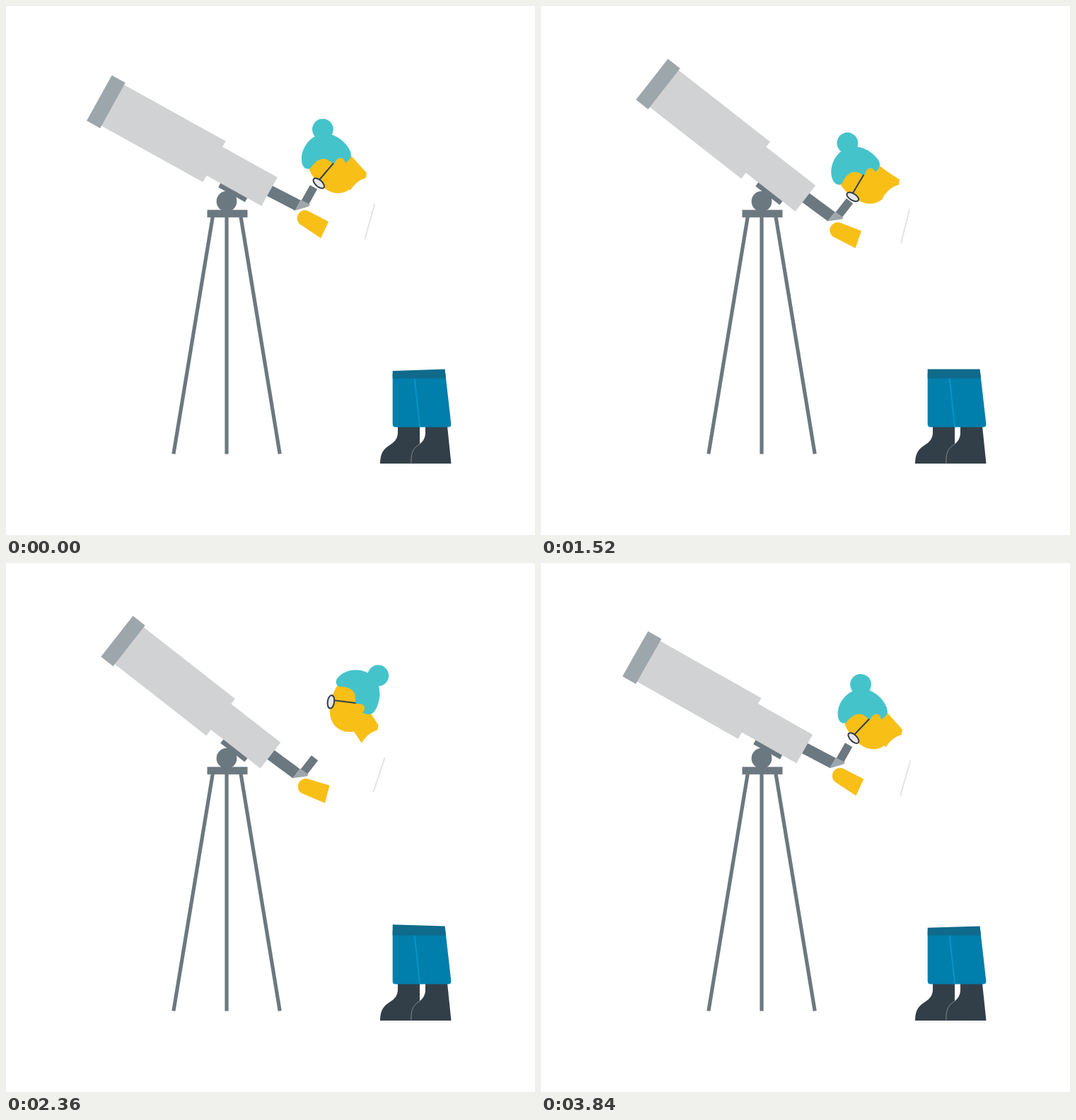
Recreate the animation shown at these times as an HTML page. Size 748x748 px, loop 3880 ms.

```html
<!DOCTYPE html>
<html lang="en">
<head>
<meta charset="utf-8">
<title>Stargazer</title>
<style>
html, body { margin: 0; width: 100%; height: 100%; overflow: hidden; background: #fff; }
svg { display: block; width: 100vw; height: 100vh; }
</style>
</head>
<body>
<svg viewBox="0 0 748 748">
  <!-- telescope: x runs along the tube, origin at the ball joint -->
  <g id="scope">
    <g fill="#6c7880">
      <rect x="-20" y="-22" width="43.3" height="10.6"/>
      <path d="M44 -50.4 L91 -51.8 V-35.4 L44 -34Z"/>
      <rect x="92" y="-77" width="11.8" height="25"/>
    </g>
    <path d="M91 -52.6 L105.5 -53 L105 -49.6 L91 -35.2Z" fill="#9da6aa"/>
    <path d="M-207 -73.6 H-42.3 V-64.4 H46.4 V-18 H-42.3 V-7.4 H-207Z" fill="#d1d2d4"/>
    <rect x="-228.3" y="-77" width="21.8" height="73.4" fill="#9da6aa"/>
  </g>

  <g fill="#6c7880">
    <path d="M292.3 298 L236.9 633.3 M312 298 V633.5 M332 298 L387.2 633.3" stroke="#6c7880" stroke-width="5.2"/>
    <rect x="284.5" y="288.3" width="57" height="10.6"/>
    <circle cx="312" cy="276.2" r="14.4"/>
  </g>

  <!-- boots and trousers -->
  <g fill="#333f48">
    <path d="M554 594 H585 V647 H529 C529 634 533 627 541 622 C549 617 554 612 554 603Z"/>
    <path d="M593 594 H624 L629.5 647 H572.8 C572.8 635 574 627 582 621.5 C589 617 593 612 593 603Z"/>
    <path d="M572.8 647.5 C572.8 635 574 627 582 621.5 L585.5 619" fill="none" stroke="#7d878e"/>
  </g>
  <path d="M546.7 520 H621.3 L629.4 591 Q629.6 595.5 625 595.5 H551 Q546.7 595.5 546.7 591Z" fill="#007eac"/>
  <path d="M577.6 526 L585.2 595.5" stroke="#0098c3" stroke-width="2"/>
  <path id="waist" fill="#0f6a8b"/>

  <path id="hand" d="M3.6 -10.5 L33.5 -1.5 L27 23.5 L-6 9.6 A11.2 11.2 0 0 1 3.6 -10.5Z" fill="#f8bf17"/>
  <line id="crease" stroke="#e3e3e4" stroke-width="1.9"/>

  <path id="neck" d="M-22 -33.5 L0 0 L5 20 L-21 29.5 L-38 4.2Z" fill="#f8bf17"/>
  <g id="head">
    <path d="M470 172 C463 180 458 196 458 210.5 C458 227 470 239 486.5 239 C502 239 515 227 515 210.5 C515 190 496 172 480 170Z" fill="#f8bf17"/>
    <path d="M471.5 174.8 C466 173 466 166.500 468.500 163.200 C474 155.500 484 151.200 494.500 151.200 C501.500 151.200 508 153 513 156 L527 173 C529.200 183 529 191 526.300 199 C524 205.500 521.500 210 518.500 212.200 C514.500 215 508.500 214.300 504 211.500 C509 207.500 508 200.500 501.500 199.300 C498.500 198.700 496.500 199 494 199.400 C493.500 193 496 186 490 180.500 C485 175.800 477.500 174.800 471.500 174.800Z" fill="#45c3cb"/>
    <circle cx="526.4" cy="159.2" r="14.9" fill="#45c3cb"/>
    <path d="M464.3 194.2 L494.5 198" stroke="#333f48" stroke-width="2"/>
    <ellipse cx="459.5" cy="196.2" rx="4.7" ry="9.4" transform="rotate(8 459.5 196.2)" fill="#e6e7e8" stroke="#333f48" stroke-width="2"/>
  </g>
  <path id="collar" d="M0 0 L-1.2 7.2 C-11 10 -18 16 -24 26 L-22 42 H20 V0Z" fill="#fff"/>
</svg>
<script>
const LOOP = 3880, STEP = 40;
const el = id => document.getElementById(id);
const parts = Object.fromEntries(
  ["scope", "waist", "hand", "crease", "neck", "head", "collar"].map(id => [id, el(id)]));

// scope angle; head, neck and hand as [x, y, angle]; crease ends; waist height
const look = { scope: 29, head: [488.5, 227.1, -56.8], neck: [510, 236, -9],
  hand: [423, 300, 11], crease: [521.3, 279.5, 507.5, 329.5], waist: 516 };
const raised = { scope: 38, head: [482.2, 238.9, -66.9], neck: [507, 245.5, -23.7],
  hand: [419.5, 317, 4.5], crease: [521.6, 286, 508.8, 335.5], waist: 513.6 };
const upright = { scope: 38, head: [504.5, 222, 0], neck: [526.5, 229, 0],
  hand: [424, 316, 0], crease: [535.7, 275, 519.3, 324.3], waist: 511.2 };

const moves = [
  { from: look, to: raised, start: 80, end: 800, x1: .83, x2: .24 },
  { from: raised, to: upright, start: 1440, end: 2400, x1: .78, x2: .3 },
  // the loop restarts just before this one has fully settled
  { from: upright, to: look, start: 3320, end: 4013, x1: .8, x2: .27 },
];

// cubic bezier easing with handles (x1, 0) and (x2, 1)
function ease(x, x1, x2) {
  if (x <= 0) return 0;
  if (x >= 1) return 1;
  let lo = 0, hi = 1, u = .5;
  for (let i = 0; i < 24; i++) {
    u = (lo + hi) / 2;
    const v = 1 - u;
    if (3 * v * v * u * x1 + 3 * v * u * u * x2 + u * u * u < x) lo = u; else hi = u;
  }
  return u * u * (3 - 2 * u);
}

const mix = (a, b, p) => Array.isArray(a) ? a.map((n, i) => mix(n, b[i], p)) : a + (b - a) * p;
const place = ([x, y, angle]) => `translate(${x} ${y}) rotate(${angle})`;
const move = (node, value) => node.setAttribute("transform", value);

function draw(t) {
  const m = moves.filter(s => t >= s.start).pop() || moves[0];
  const p = ease((t - m.start) / (m.end - m.start), m.x1, m.x2);
  const pose = {};
  for (const key in look) pose[key] = mix(m.from[key], m.to[key], p);

  move(parts.scope, place([312, 276, pose.scope]));
  move(parts.head, place(pose.head) + " translate(-504.5 -222)");
  move(parts.neck, place(pose.neck));
  move(parts.collar, place([pose.neck[0], pose.neck[1], 0]));
  move(parts.hand, place(pose.hand));
  ["x1", "y1", "x2", "y2"].forEach((k, i) => parts.crease.setAttribute(k, pose.crease[i]));
  parts.waist.setAttribute("d", `M546.7 ${pose.waist} L620.600 513.500 L622 526.400 H546.700Z`);
}

const began = performance.now();
function tick() {
  const t = (performance.now() - began) % LOOP;
  draw(Math.floor(t / STEP) * STEP);
  requestAnimationFrame(tick);
}
tick();
</script>
</body>
</html>
```
